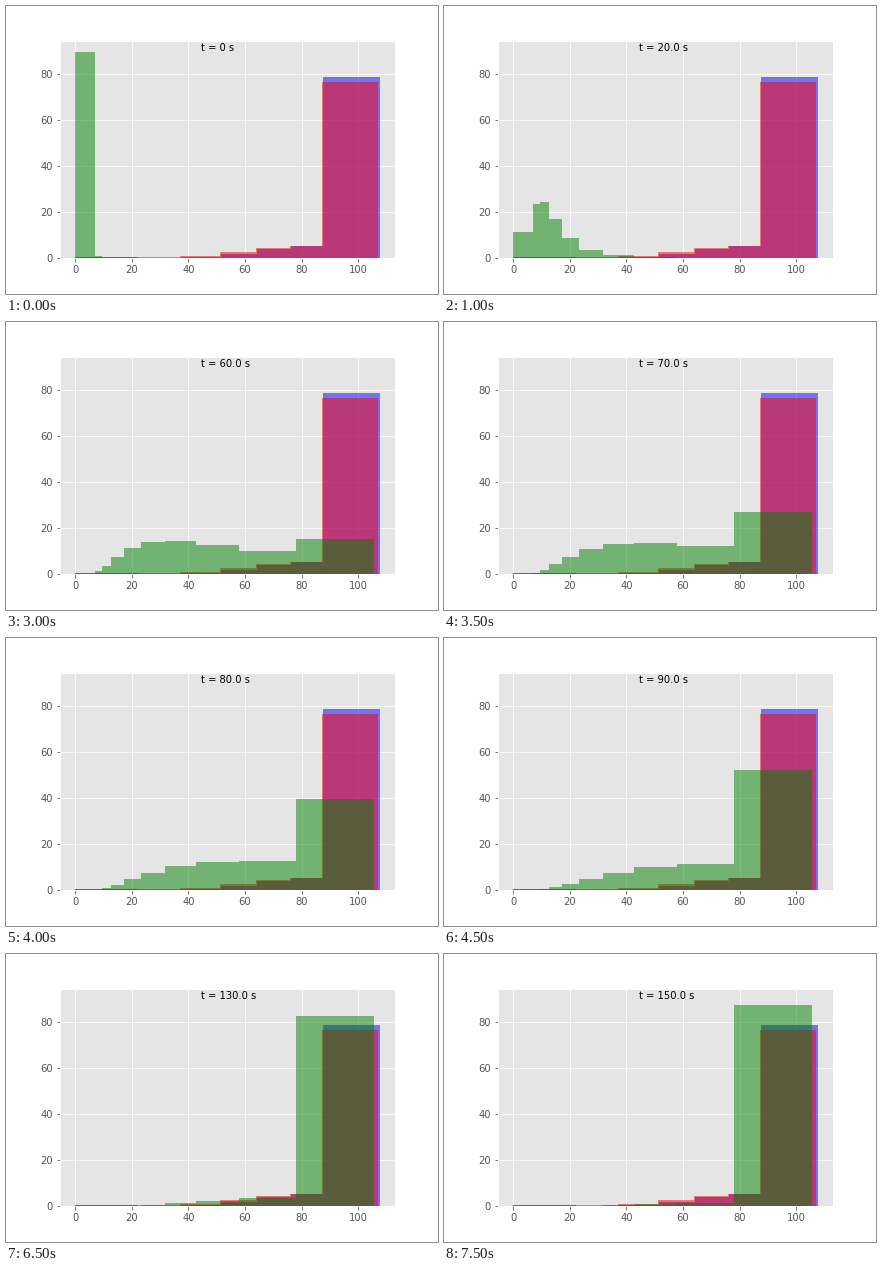
Write a matplotlib script that moves like this. It is 432 px wide and 288 px high and loops after 8000 ms.

```python
import math

import matplotlib.pyplot as plt
import numpy as np
from matplotlib.animation import FuncAnimation

plt.style.use("ggplot")

TOTAL = 90        # population shared by every histogram
RATE = 0.1028     # mean upward steps per second
START = 0.0075    # mean steps already taken at t = 0
STEP = 10         # seconds between frames
FRAMES = 16
TOP_BIN = 9
X_MAX = 107.55
BLUE_SCALE = 1.0045


def counts_at(t):
    """Poisson-distributed steps, with everything above the top bin pooled."""
    mean = RATE * t + START
    p = [math.exp(-mean) * mean**k / math.factorial(k) for k in range(TOP_BIN)]
    return TOTAL * np.array(p + [1 - sum(p)])


def steady_edges(scale=1.0):
    """Wide outer bins, with inner widths shrinking by a constant ratio."""
    widths = 15 * 0.928 ** np.arange(5)
    inner = 22.2 + np.concatenate([[0], np.cumsum(widths)])
    return scale * np.concatenate([[0], inner, [X_MAX / BLUE_SCALE]])


def steady_counts(falloff):
    """Bell-shaped tail, a few stragglers at zero, the rest in the last bin."""
    tail = 5.1 * np.exp(-falloff * np.arange(5, -1, -1) ** 2)
    tail[0] = 0.3
    return np.append(tail, TOTAL - tail.sum())


def draw_hist(ax, edges, counts, color):
    return ax.bar(edges[:-1], counts, np.diff(edges), align="edge",
                  color=color, alpha=0.5, linewidth=0)


fig, ax = plt.subplots(figsize=(6, 4), dpi=72)
fig.subplots_adjust(left=0.125, right=0.9, bottom=0.125, top=0.88)

grow_edges = np.append(0, 105.65 * 1.3525 ** np.arange(-TOP_BIN, 1.0))
draw_hist(ax, steady_edges(BLUE_SCALE), steady_counts(0.28), "blue")
draw_hist(ax, steady_edges(), steady_counts(0.18), "red")
bars = draw_hist(ax, grow_edges, counts_at(0), "green")

ax.set_xlim(-0.05 * X_MAX, 1.05 * X_MAX)
ax.set_ylim(0, 1.05 * TOTAL)
label = ax.text(0.42, 0.95, "", transform=ax.transAxes, color="black")


def update(i):
    t = i * STEP
    for bar, count in zip(bars, counts_at(t)):
        bar.set_height(count)
    label.set_text(f"t = {t:.1f} s" if i else "t = 0 s")
    return [*bars, label]


anim = FuncAnimation(fig, update, frames=FRAMES, interval=500,
                     repeat=True, repeat_delay=0)
plt.show()
```
